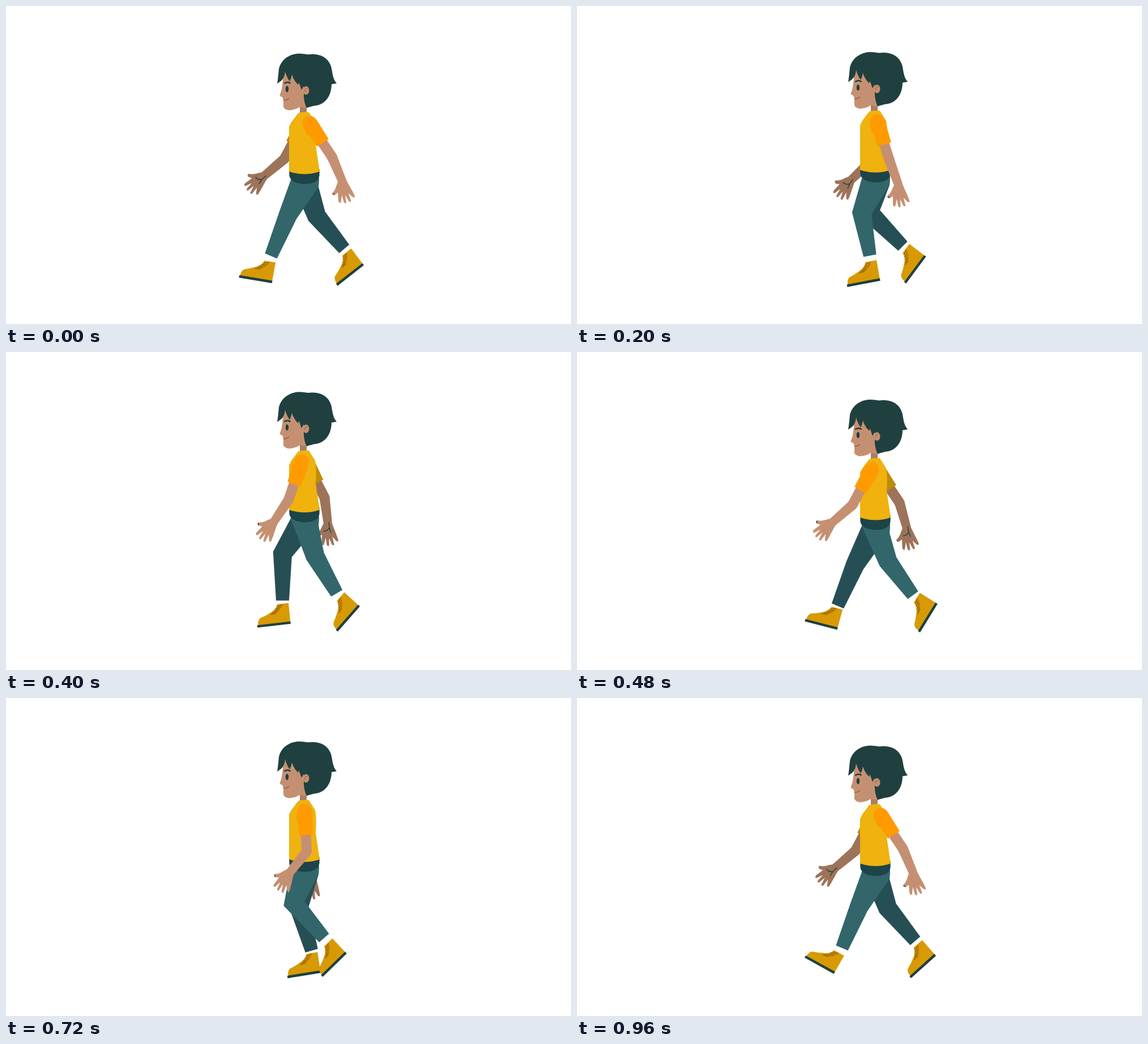
Write an HTML page that moves like this. It is 998 by 561 pixels and loops after 1 s.

```html
<!DOCTYPE html>
<html lang="en">
<head>
<meta charset="utf-8">
<title>Walk cycle</title>
<style>
html, body { margin: 0; width: 100%; height: 100%; overflow: hidden; background: #fff; }
svg { display: block; width: 100%; height: 100%; }
</style>
</head>
<body>
<svg viewBox="0 0 998 561">
  <defs>
    <path id="sleeve" d="M0-13C9-13 14-6 14 3L12.5 42Q0 43-12 41L-12 17L-15 14L-12-2C-10-9-6-13 0-13Z"/>
    <path id="hand" d="M-7-2C-11 3-13 9-17 13L-22 17Q-22 21-18 21L-12 18L-14 33Q-13 38-10 36L-6 24L-5 37Q-3 41-1 38L0 25L4 37Q6 40 8 37L6 23L12 31Q16 34 16 30C14 20 10 10 7.500 0Z"/>
    <g id="shoe">
      <path fill="#d79a04" d="M-10 10H10L9.500 43H-48Q-48 35-43 31Q-33 28-25 24Q-13 19-10 10Z"/>
      <path fill="none" stroke="#955e0c" stroke-width="1.5" d="M-11 14L-1 12M-14 17.500L-3 15.500M-17 21L-6 19M-20.500 24L-10 22.500M-24 26.500L-14 25.500"/>
      <path fill="#1f403f" d="M-49.500 42.500H9.700V47H-49.500Z"/>
    </g>
  </defs>
  <g id="farArm" fill="#9d735a"></g>
  <g id="farLeg" fill="#264f55"></g>
  <g id="nearLeg" fill="#32666b"></g>
  <g id="body">
    <path fill="#1d4448" d="M500 288H554L553.500 300Q550 314 527 314Q504 313 500.500 300Z"/>
    <path fill="#ad7d62" d="M519 172H531V192H519Z"/>
    <path fill="#efb20e" d="M516 189Q526 186 535 187.500L546 205Q549 220 547 245L554 292Q527 301 500 292V213L504 205Z"/>
    <path fill="#c59072" d="M491 112L488 140Q487 150 483.500 157Q484 160 488 160.500L490 166L490 178Q492 183 500 184Q512 183 519 178L531 180L532 140L515 110Z"/>
    <path fill="#1f403f" d="M479 137C480 131 481 122 482 111C485 98 497 84 519 84Q526 84 533 85.500C552 83 568 89 574 106C577 116 576 127 584 136.500L575 138C575 160 562 174 548 175.500Q538 177 531 180Q527 172 526 160L526 141L522 148L517.500 135L516 139Q509 133 505 121Q504 128 501 133Q496 126 493 115.500Q492 127 486 132Z"/>
    <ellipse cx="530" cy="149" rx="5.500" ry="7.500" fill="#c59072"/>
    <path fill="none" stroke="#8f6048" d="M527.500 151Q528 145 532.500 145.500"/>
    <ellipse cx="496.500" cy="146.500" rx="2.700" ry="5.500" fill="#1f403f"/>
    <path fill="none" stroke="#1f403f" stroke-width="2.400" d="M491 136.500Q498 132.500 502.500 136.500"/>
    <path fill="none" stroke="#8a5238" stroke-width="1.200" d="M490 166.500Q496 166.500 500 163"/>
  </g>
  <g id="nearArm" fill="#c59072"></g>
</svg>
<script>
const LOOP = 1000, STEP = 40;
const UPPER = 71, FORE = 47;
const HIP = { x: 528, y: 308 }, SHOULDER_Y = 207;
const TIMES = [0, 120, 320, 480, 640, 800, 960];
const $ = id => document.getElementById(id);

// Smooth curve through the keys that never overshoots them.
function curve(times, values) {
  const slope = times.slice(1).map((t, i) => (values[i + 1] - values[i]) / (t - times[i]));
  const last = times.length - 1;
  const tangent = values.map((_, i) => {
    if (i === 0) return slope[0];
    if (i === last) return slope[last - 1];
    const a = slope[i - 1], b = slope[i];
    return a * b <= 0 ? 0 : 2 * a * b / (a + b);
  });
  return t => {
    let i = 0;
    while (i < last - 1 && t > times[i + 1]) i++;
    const h = times[i + 1] - times[i];
    const u = Math.min(1, Math.max(0, (t - times[i]) / h)), v = 1 - u;
    return values[i] * (1 + 2 * u) * v * v + values[i + 1] * u * u * (3 - 2 * u)
      + h * u * v * (tangent[i] * v - tangent[i + 1] * u);
  };
}

const track = values => curve(TIMES, values);
const bob = curve([0, 120, 160, 320, 360, 480], [0, 7.5, 2, -14.5, -16.5, 0]);
const lift = t => bob(t % 480);

// Bone given by its vectors at the key times, blended as angle and length.
function bone(vectors) {
  const angle = track(vectors.map(([x, y]) => Math.atan2(x, y)));
  const length = track(vectors.map(([x, y]) => Math.hypot(x, y)));
  return t => {
    const a = angle(t);
    return { dx: Math.sin(a), dy: Math.cos(a), length: length(t) };
  };
}

const fix = n => n.toFixed(2);
const place = (x, y, a) => `translate(${fix(x)} ${fix(y)}) rotate(${fix(a)})`;

// Keys per pose: knee x, knee y, ankle x, ankle y, foot angle, foot gap.
function makeLeg(id, keys) {
  const thigh = bone(keys.map((k, i) => [k[0] - HIP.x, k[1] - HIP.y - lift(TIMES[i])]));
  const shin = bone(keys.map(k => [k[2] - k[0], k[3] - k[1]]));
  const footAngle = track(keys.map(k => k[4]));
  const footGap = track(keys.map(k => k[5]));
  const group = $(id);
  group.innerHTML = '<path fill="#fff" d="M-10-3H10V12H-10Z"/><path/><use href="#shoe"/>';
  const [sock, cloth, shoe] = group.children;

  return t => {
    const hx = HIP.x, hy = HIP.y + lift(t);
    const a = thigh(t), b = shin(t);
    const kx = hx + a.dx * a.length, ky = hy + a.dy * a.length;
    const ax = kx + b.dx * b.length, ay = ky + b.dy * b.length;
    // Mitred knee across the bisector of both bones.
    const sx = a.dx + b.dx, sy = a.dy + b.dy;
    const miter = 16.5 * 2 / (sx * sx + sy * sy);
    const nx = sy * miter, ny = -sx * miter;
    const ex = b.dy * 11.5, ey = -b.dx * 11.5;
    const points = [
      [hx - 25, hy - 1], [hx - 22, hy - 8], [hx + 22, hy - 8], [hx + 25, hy - 4], [hx + 24, hy + 11],
      [kx + nx, ky + ny], [ax + ex, ay + ey], [ax - ex, ay - ey], [kx - nx, ky - ny]
    ];
    cloth.setAttribute('d', 'M' + points.map(p => p.map(fix).join(' ')).join('L') + 'Z');
    const foot = place(ax, ay, footAngle(t));
    sock.setAttribute('transform', foot);
    shoe.setAttribute('transform', `${foot} translate(0 ${fix(footGap(t))})`);
  };
}

// Keys per pose: shoulder x, then upper arm, forearm and hand angles.
function makeArm(id, sleeveColor, detail, keys) {
  const [shoulder, upper, fore, hand] = [0, 1, 2, 3].map(i => track(keys.map(k => k[i])));
  const group = $(id);
  group.innerHTML = `<g>
    <g class="fore">
      <circle r="9"/><path d="M-9 0H9L7.5 ${FORE}H-7.5Z"/>
      <g class="hand"><circle r="7.300"/><use href="#hand"/>
        <path fill="none" stroke="#1f403f" stroke-width="1.400" d="${detail}"/></g>
    </g>
    <path d="M-9 30H9V${UPPER}H-9Z"/>
    <use href="#sleeve" fill="${sleeveColor}"/></g>`;
  const armNode = group.firstElementChild;
  const foreNode = group.querySelector('.fore'), handNode = group.querySelector('.hand');

  return t => {
    const a = upper(t), b = fore(t), c = hand(t);
    armNode.setAttribute('transform', place(shoulder(t), SHOULDER_Y + lift(t), -a));
    foreNode.setAttribute('transform', place(0, UPPER, a - b));
    handNode.setAttribute('transform', place(0, FORE, b - c));
  };
}

const parts = [
  makeLeg('nearLeg', [
    [498, 369, 468, 441, 9.5, 0],
    [491.5, 367, 492.5, 442, 0.5, 0],
    [537, 363, 567.5, 434, -32, 0],
    [549.5, 370, 593.5, 429, -58.5, -2],
    [525, 371, 586, 424.5, -55.5, 1],
    [498, 355, 532.5, 427, -24.5, 0],
    [498, 369, 468, 441, 29, 0]
  ]),
  makeLeg('farLeg', [
    [549, 371, 597.5, 428.5, -38, -3],
    [537, 374, 597.5, 426, -58.5, -3],
    [489, 350, 530, 423, -34.5, -3],
    [491, 376, 460.5, 448, 14.5, -6],
    [502, 376, 510, 451, 0, -6],
    [535, 362, 570, 437, -19.5, -5],
    [549, 371, 597.5, 428.5, -42, -3]
  ]),
  makeArm('nearArm', '#ff9a00', 'M-21.500 17.500L-18.500 20.500', [
    [536, 34, 23, 12],
    [533, 28, 32, 17],
    [525, -3, -14, -21],
    [520, -28, -49, -45],
    [524, -8, -60, -48],
    [530, 15, -8, -6],
    [536, 34, 23, 12]
  ]),
  makeArm('farArm', '#be8b0a', 'M2-3V7Q-2 13-9 12M2 7L4 16', [
    [525, -28, -50, -46],
    [526, -20, -62, -48],
    [530, 15, -8, -6],
    [530, 34, 16, 10],
    [529, 22, 18, 9],
    [524, -5, -20, -23],
    [525, -28, -50, -46]
  ])
];

function draw(time) {
  const t = Math.floor((time % LOOP) / STEP) * STEP;
  $('body').setAttribute('transform', `translate(0 ${fix(lift(t))})`);
  parts.forEach(pose => pose(t));
}

let start;
function tick(now) {
  if (start === undefined) start = now;
  draw(now - start);
  requestAnimationFrame(tick);
}
draw(0);
requestAnimationFrame(tick);
</script>
</body>
</html>
```
